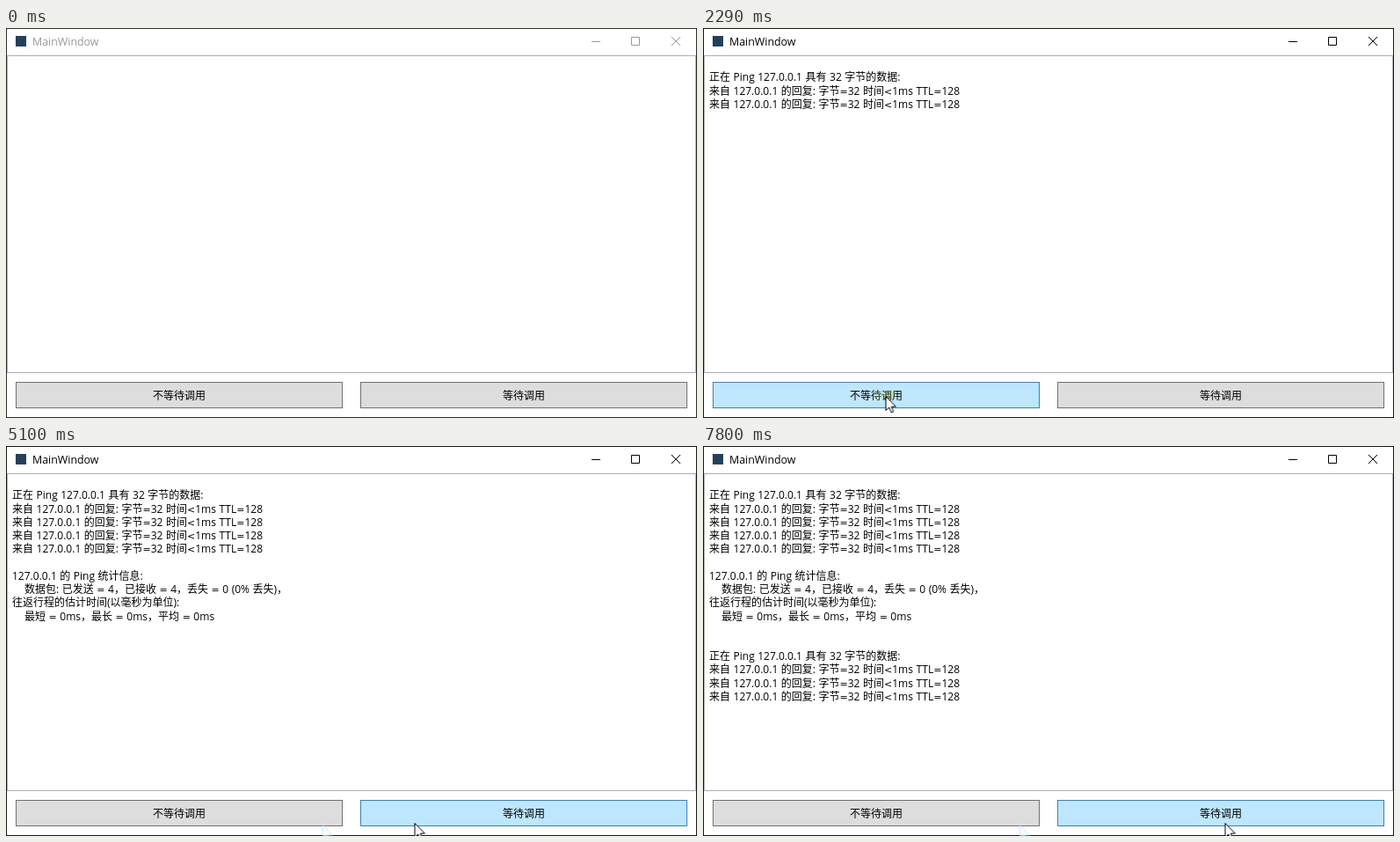
An HTML page for the animation above (8000 ms loop, 786 by 443 pixels).

```html
<!DOCTYPE html>
<html lang="zh-CN">
<head>
<meta charset="utf-8">
<title>MainWindow</title>
<style>
  html, body { margin: 0; width: 100%; height: 100%; overflow: hidden; background: #fff; }
  svg { display: block; width: 786px; height: 443px; overflow: hidden; }
  text {
    font: 12px "Open Sans", "Noto Sans", "Noto Sans CJK SC", "Noto Sans CJK", sans-serif;
    white-space: pre; word-spacing: .4px; text-autospace: no-autospace;
  }
  .op { font: 11px "DejaVu Sans", sans-serif; }
  .title { font-size: 12.4px; }
  .label { text-anchor: middle; }
</style>
</head>
<body>
<svg viewBox="0 0 786 443">
  <defs>
    <path id="arrow" d="M.5 .5V16.5L4.2 13L6.7 18.8L9.2 17.7L6.8 12.1H11.8Z"/>
    <clipPath id="spot"><circle cx="208" cy="418" r="12"/></clipPath>
  </defs>
  <rect width="786" height="443" fill="#fff"/>
  <rect x="1.5" y="31.5" width="783" height="360" fill="none" stroke="#abadb3"/>
  <rect id="frame" x=".5" y=".5" width="785" height="442" fill="none"/>
  <rect x="11" y="9" width="12" height="12" fill="#24405c"/>
  <text id="title" class="title" x="30" y="20">MainWindow</text>
  <path id="controls" fill="none" d="M666 15.5H676M711.5 10.5H720.5V19.5H711.5ZM757 10L767 20M767 10L757 20"/>

  <g id="log"></g>

  <rect id="left" x="11.5" y="402.5" width="371" height="29"/>
  <rect id="right" x="403.5" y="402.5" width="371" height="29"/>
  <text class="label" x="197" y="422">不等待调用</text>
  <text class="label" x="589" y="422">等待调用</text>
  <g id="tint" clip-path="url(#spot)">
    <text class="label" x="197" y="422" fill="#5c5f1c">不等待调用</text>
  </g>

  <use id="trail" href="#arrow" x="360" y="430" fill="#f0faff" stroke="#b5dff2" opacity=".6"/>
  <g id="cursor">
    <circle id="click" r="12" fill="#ff0" opacity=".5"/>
    <use href="#arrow" fill="#fff" stroke="#000"/>
  </g>
</svg>
<script>
const LOOP = 8000;
const $ = id => document.getElementById(id);

// Holds each [time, value] until the next entry.
function hold(el, prop, table) {
  const frames = table.map(([time, value]) =>
    ({ offset: time / LOOP, [prop]: value, easing: 'step-end' }));
  frames.push({ offset: 1, [prop]: table[table.length - 1][1] });
  el.animate(frames, { duration: LOOP, iterations: Infinity });
}

function show(el, from, to = LOOP) {
  const table = [[0, 'hidden'], [from, 'visible']];
  if (to < LOOP) table.push([to, 'hidden']);
  hold(el, 'visibility', table);
}

// Log output: [time, first row, lines]
const intro = '正在 Ping 127.0.0.1 具有 32 字节的数据:';
const reply = '来自 127.0.0.1 的回复: 字节=32 时间<1ms TTL=128';
const summary = [
  '127.0.0.1 的 Ping 统计信息:',
  '    数据包: 已发送 = 4，已接收 = 4，丢失 = 0 (0% 丢失)，',
  '往返行程的估计时间(以毫秒为单位):',
  '    最短 = 0ms，最长 = 0ms，平均 = 0ms'
];
const output = [
  [1270, 1, [intro, reply]],
  [2290, 3, [reply]],
  [3220, 4, [reply]],
  [4310, 5, [reply, '', ...summary]],
  [5850, 13, [intro, reply]],
  [6720, 15, [reply]],
  [7650, 16, [reply]]
];

function svg(tag, parent, attrs) {
  const el = document.createElementNS('http://www.w3.org/2000/svg', tag);
  for (const name in attrs) el.setAttribute(name, attrs[name]);
  return parent.appendChild(el);
}

for (const [time, row, lines] of output) {
  const block = svg('g', $('log'), {});
  lines.forEach((line, i) => {
    const text = svg('text', block, { x: 7, y: Math.round(45.2 + 15.23 * (row + i)) });
    for (const part of line.split(/([=<])/)) {
      const isOp = part === '=' || part === '<';
      svg('tspan', text, isOp ? { class: 'op' } : {}).textContent = part;
    }
  });
  show(block, time);
}

// Buttons
const looks = {
  normal: ['#ddd', '#707070'],
  hover: ['#bee6fd', '#3c7fb1'],
  pressed: ['#c4e5f6', '#2c628b']
};
function button(el, states) {
  ['fill', 'stroke'].forEach((prop, i) =>
    hold(el, prop, states.map(([time, state]) => [time, looks[state][i]])));
}
button($('left'), [[0, 'normal'], [660, 'hover'], [1130, 'pressed'], [1200, 'hover'], [5100, 'normal']]);
button($('right'), [[0, 'normal'], [5100, 'hover'], [5480, 'pressed'], [5850, 'hover']]);

// Window activation
hold($('title'), 'fill', [[0, '#999'], [1130, '#000']]);
hold($('controls'), 'stroke', [[0, '#999'], [1130, '#000']]);
hold($('frame'), 'stroke', [[0, '#2e2e2e'], [1130, '#181818']]);

// Pointer
const path = [
  [0, 196, 450], [580, 196, 434], [660, 203, 425], [740, 207, 420], [810, 208, 418],
  [4850, 225, 422], [4930, 290, 429], [5010, 360, 430], [5100, 465, 428],
  [5160, 530, 428], [5240, 575, 428], [5330, 595, 428], [7800, 594, 428]
];
hold($('cursor'), 'transform', path.map(([time, x, y]) => [time, `translate(${x - .5}px, ${y}px)`]));
hold($('click'), 'visibility', [
  [0, 'hidden'], [1130, 'visible'], [1270, 'hidden'], [5480, 'visible'], [5620, 'hidden']
]);
show($('tint'), 1130, 4850);
show($('trail'), 5100);
</script>
</body>
</html>
```
